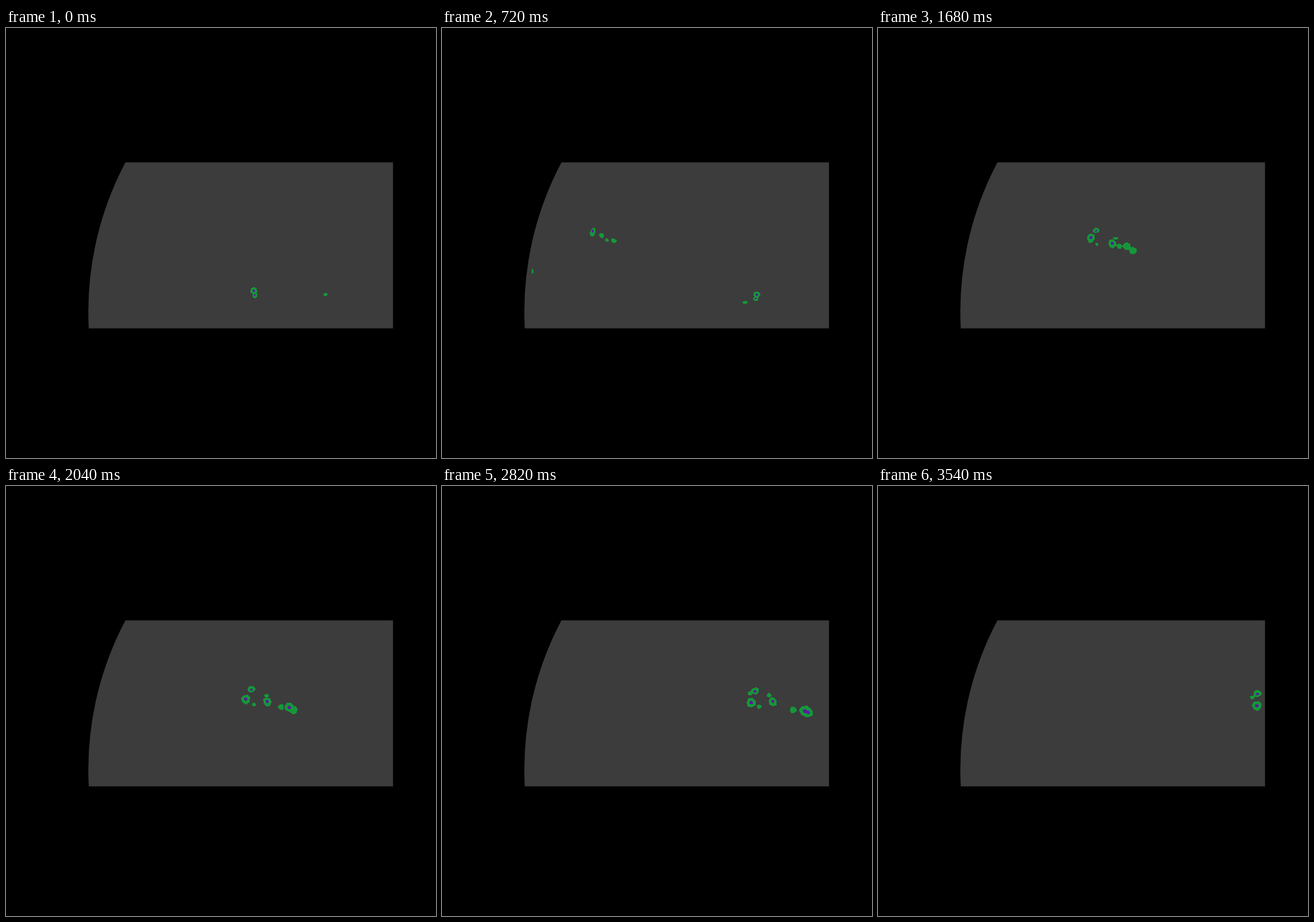
Animation, 748 px wide and 748 px high, one loop 3600 ms. Source, as an HTML page:

```html
<!DOCTYPE html>
<html lang="en">
<head>
<meta charset="utf-8">
<title>Drifting cells</title>
<style>
html, body { margin: 0; width: 100%; height: 100%; overflow: hidden; background: #000; }
svg { display: block; width: 100%; height: 100%; }
</style>
</head>
<body>
<svg viewBox="0 0 748 748">
  <defs>
    <path id="field" d="M207.8 233.7H673.2V522.6H144A555 555 0 0 1 207.8 233.7Z"/>
    <clipPath id="area"><use href="#field"/></clipPath>
  </defs>
  <use href="#field" fill="#3c3c3c"/>
  <g clip-path="url(#area)" shape-rendering="crispEdges">
    <path id="rain" fill="#16963a"/>
    <path id="core" fill="#5a1c9c"/>
  </g>
</svg>
<script>
const LOOP = 3600, STEP = 60;
const rain = document.getElementById('rain');
const core = document.getElementById('core');
const cells = [];

// Wind: x of each group's leading cell, with time in seconds
const south = t => 431 + 140 * t + 30.4 * t * t;
const north = t => 133.6 + 139 * t + 18.6 * Math.log(Math.cosh((t - 2.05) / 0.6));

// A cell rides the wind and eases from one pose to another during `span`.
// Pose: x offset from the wind, y, half width, half height
function cell(wind, life, span, from, to, { tilt = 0, slip = [0, 0], hollow = Infinity } = {}) {
  cells.push({ wind, life, span, from, to, tilt: tilt * Math.PI / 180, slip, hollow });
}

cell(south, [0, 3.6], [0, 1.1], [0, 457, 5.9, 6], [0, 466.5, 6, 5.5], { hollow: 0 });
cell(south, [0, 3.6], [0, 1.1], [2, 465, 4.4, 5], [-3, 473, 4.2, 4.2], { hollow: 0 });
cell(south, [0, 0.33], [0, 1], [125, 463.5, 3.8, 2.6], [125, 464, 3, 2], { tilt: -15 });
cell(south, [0.6, 3.6], [0.6, 1.2], [-20.5, 477, 5, 2.2], [-19, 480.5, 4, 2.5]);

cell(north, [0.42, 3.6], [0.8, 2.5], [0, 355.5, 4.6, 8], [0, 374.5, 8.2, 8.3],
  { tilt: 15, slip: [0, 7.5], hollow: 0 });
cell(north, [0.96, 3.6], [0.9, 2.4], [8, 350, 4, 2.7], [10, 354, 7.2, 6],
  { tilt: -12, slip: [-8, 6.2], hollow: 1.6 });
cell(north, [2.1, 3.6], [2.1, 2.3], [2, 355, 3, 2.5], [2, 356, 4, 3.5], { slip: [-8, 9.5] });
cell(north, [1.56, 3.24], [1.6, 2.4], [10, 376, 2.5, 2.5], [17, 383.5, 4.3, 3.6], { slip: [-8, 1] });

cell(north, [0.54, 3.6], [0.9, 1.75], [15.5, 361, 4, 4.8], [37.5, 375.5, 6.8, 8], { tilt: -28, hollow: 1.6 });
cell(north, [1.56, 3.6], [1.6, 2.4], [43, 366, 4.5, 2.3], [31, 364, 3.8, 3.8]);
cell(north, [0.6, 3.6], [0.6, 2.7], [24, 368.7, 3.7, 2.5], [73, 389.5, 5.7, 5.8], { tilt: 25 });
cell(north, [0.54, 3.6], [0.6, 2.9], [36, 370, 5, 3.8], [94, 391.5, 10, 9.5], { tilt: 25, hollow: 2 });
cell(north, [1.5, 3.6], [1.4, 2.8], [70, 386.5, 6.6, 6], [99, 394, 8.2, 8.3], { tilt: 15, hollow: 2.2 });

// brief specks near the western edge
cell(north, [0.7, 0.77], [0, 1], [-105, 423, 1.5, 4.2], [-105, 423, 1.5, 4.2]);
cell(north, [1.85, 1.93], [1, 2], [-138, 446, 2.3, 2.3], [-138, 446, 2.3, 2.3]);

function smooth(t, [a, b]) {
  const u = Math.min(1, Math.max(0, (t - a) / (b - a)));
  return u * u * (3 - 2 * u);
}

// Ragged ellipse whose edge slowly changes
function blob(x, y, w, h, tilt, seed, t) {
  const n = 20, c = Math.cos(tilt), s = Math.sin(tilt);
  let d = '';
  for (let i = 0; i < n; i++) {
    const a = i / n * 2 * Math.PI;
    const r = 1 + 0.06 * Math.sin(3 * a + seed * 2.3 + t * 4) + 0.06 * Math.sin(7 * a - seed * 1.7 + t * 9);
    const px = w * r * Math.cos(a), py = h * r * Math.sin(a);
    d += (i ? 'L' : 'M') + (x + px * c - py * s).toFixed(2) + ' ' + (y + px * s + py * c).toFixed(2);
  }
  return d + 'Z';
}

function draw(t) {
  let green = '', purple = '';
  cells.forEach((k, i) => {
    if (t < k.life[0] || t > k.life[1]) return;
    const u = smooth(t, k.span), late = Math.max(0, t - k.span[1]);
    const [dx, dy, w, h] = k.from.map((v, j) => v + (k.to[j] - v) * u);
    const x = k.wind(t) + dx + k.slip[0] * late;
    const y = dy + k.slip[1] * late;
    green += blob(x, y, w, h, k.tilt, i, t);
    if (t >= k.hollow) {
      // tall cells carry the core high, wide ones low
      purple += blob(x, y + (w - h) * 0.6, w * 0.38, h * 0.36, k.tilt, i + 5, t);
    }
  });
  rain.setAttribute('d', green);
  core.setAttribute('d', purple);
}

const start = performance.now();
function tick() {
  const t = (performance.now() - start) % LOOP;
  draw(Math.floor(t / STEP) * STEP / 1000);
  requestAnimationFrame(tick);
}
tick();
</script>
</body>
</html>
```
